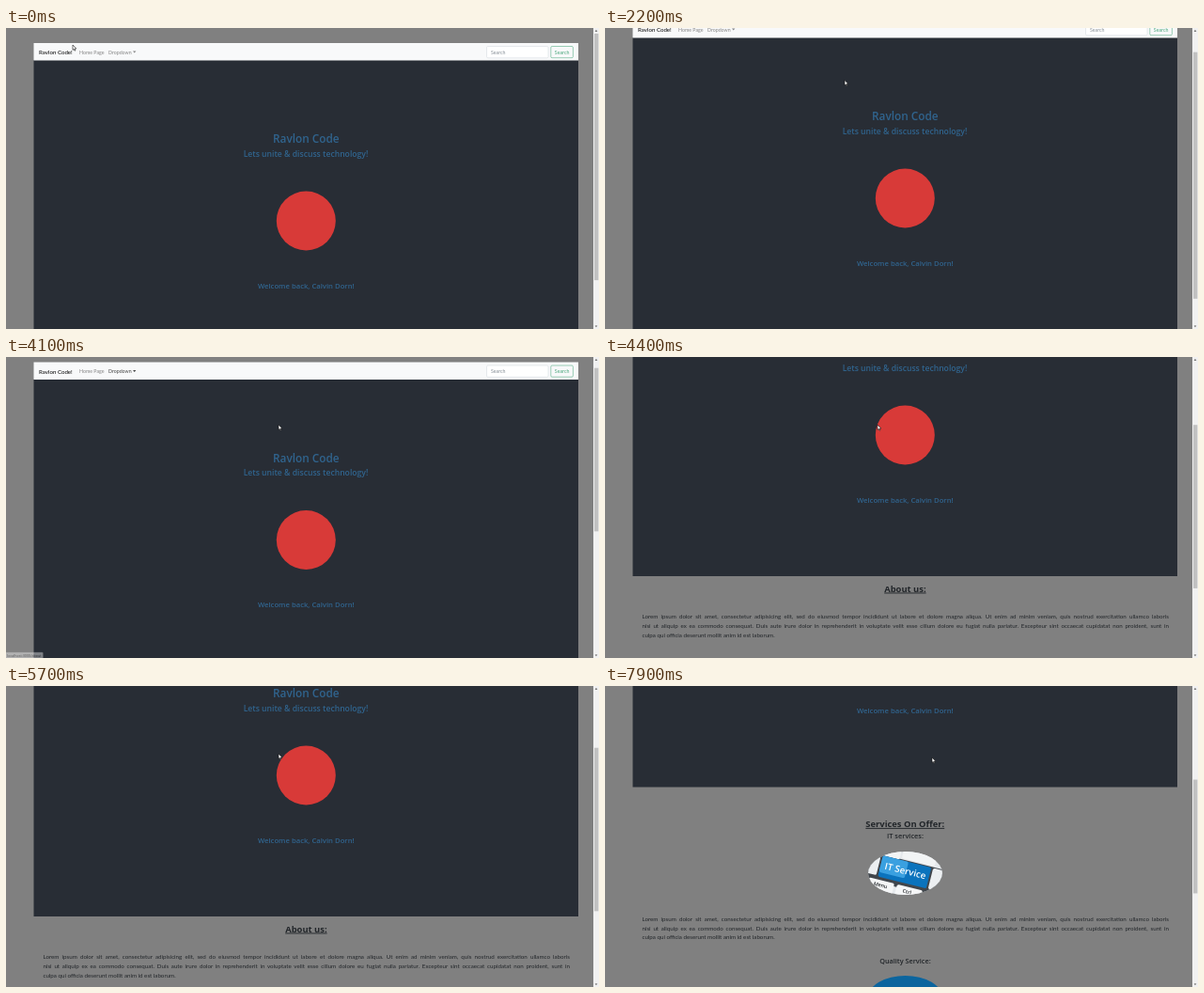
These frames come from a looping animation (631x320 px, 8 s). An HTML page:

```html
<!DOCTYPE html>
<html lang="en">
<head>
<meta charset="utf-8">
<title>Page tour</title>
<style>
  html, body { margin: 0; width: 631px; height: 320px; overflow: hidden; background: #fff; }
  #stage { position: relative; width: 631px; height: 320px; overflow: hidden; background: #fff; }
  #page, #page > svg, #over { position: absolute; left: 0; top: 0; }
  text { font-family: Lato, sans-serif; font-size: 5.25px; fill: #212529; }
  .head text, text.head { font-family: "Open Sans", "Noto Sans", sans-serif; }
  .mid { text-anchor: middle; }
  .head.mid text { font-weight: 600; }
  .blue text { fill: #30648e; }
  .head.mid .title { font-weight: 700; text-decoration: underline; }
  .para { position: absolute; left: 39.5px; width: 560.5px; font: 6.2px/9.8px Lato, sans-serif; color: #212529; }
  .para span { display: block; white-space: nowrap; text-align: justify; text-align-last: justify; }
  .para span:last-child { text-align-last: left; }
</style>
</head>
<body>
<div id="stage">
  <div id="page">
    <svg width="631" height="820" viewBox="0 0 631 820">
      <rect id="ground" width="625" height="820" fill="#808080"/>
      <rect x="29.5" y="34" width="579.5" height="321" fill="#282d35"/>
      <rect x="29.5" y="16" width="579.5" height="18.5" fill="#f8f9fa"/>

      <text x="35" y="28.2" style="font-size:6.15px;fill:#000">Ravlon Code!</text>
      <text id="home" x="78" y="27.8">Home Page</text>
      <g id="drop">
        <text x="109" y="27.8" style="fill:inherit">Dropdown</text>
        <path d="M135 24.6h3.4l-1.7 1.8z"/>
      </g>
      <rect x="511.5" y="19.5" width="65.5" height="12.3" rx="1.3" fill="#fff" stroke="#ced4da" stroke-width=".5"/>
      <text x="516" y="27.8" style="fill:#868e96">Search</text>
      <rect x="579.8" y="19.5" width="23.6" height="12.2" rx="1.3" fill="none" stroke="#4aa77c" stroke-width=".55"/>
      <text class="mid" x="591.6" y="27.8" style="fill:#4aa77c">Search</text>

      <g class="head mid blue">
        <text x="319.3" y="122" style="font-size:11.8px">Ravlon Code</text>
        <text x="319" y="136.6" style="font-size:8.65px">Lets unite &amp; discuss technology!</text>
        <text x="319.3" y="276.8" style="font-size:7.7px">Welcome back, Calvin Dorn!</text>
      </g>
      <circle cx="319.3" cy="205" r="31.5" fill="#d83a38"/>

      <g id="about" class="head mid">
        <text class="title" x="319.4" y="371.5" style="font-size:9.4px">About us:</text>
      </g>

      <g id="services" class="head mid">
        <text class="title" x="319.3" y="397.4" style="font-size:9.4px">Services On Offer:</text>
        <text x="319.5" y="409.8" style="font-size:7.4px">IT services:</text>
        <clipPath id="oval"><ellipse cx="319.5" cy="446.5" rx="39.5" ry="23"/></clipPath>
        <g clip-path="url(#oval)">
          <rect x="279" y="422" width="81" height="49" fill="#e6e9ec"/>
          <g transform="rotate(14 319.5 446.5)">
            <rect x="270" y="433" width="100" height="30" fill="#41464c"/>
            <rect x="270" y="421" width="40" height="13" rx="2" fill="#f2f4f5"/>
            <rect x="312" y="419" width="36" height="13" rx="2" fill="#f2f4f5"/>
            <rect x="275" y="436" width="15" height="20" rx="2" fill="#eceff1"/>
            <rect x="292" y="434" width="53" height="23" rx="2" fill="#0b73bd"/>
            <rect x="292" y="434" width="28" height="18" rx="2" fill="#3aa0e0"/>
            <rect x="347" y="434" width="20" height="23" rx="2" fill="#eceff1"/>
            <rect x="283" y="460" width="28" height="16" rx="2" fill="#f5f6f7"/>
            <rect x="314" y="460" width="28" height="16" rx="2" fill="#f5f6f7"/>
            <text x="319" y="447.5" style="font-size:9.8px;fill:#fff">IT Service</text>
            <text x="297" y="467" style="font-size:5.4px">Menu</text>
            <text x="326" y="467" style="font-size:5.4px">Ctrl</text>
          </g>
        </g>
        <text x="319.4" y="542.2" style="font-size:7.3px">Quality Service:</text>
        <ellipse cx="319.5" cy="578.5" rx="39.5" ry="23" fill="#0b659e"/>
      </g>
    </svg>
    <div id="aboutText"></div>
    <div id="servicesText"></div>
    <svg id="menu" width="631" height="80">
      <rect x="107.2" y="33.2" width="51.6" height="25.6" rx="1.2" fill="#fff" stroke="#c9cbcd" stroke-width=".5"/>
      <rect id="mark" x="107.4" width="51.2" height="10.4"/>
      <text id="item1" x="115" y="42.7">About Us</text>
      <text x="115" y="53.1">Services</text>
    </svg>
  </div>

  <svg id="over" width="631" height="320">
    <rect x="625" width="6" height="320" fill="#f1f1f1"/>
    <path d="M626.6 3.8h2.8l-1.4-1.7zM626.6 316.4h2.8l-1.4 1.7z" fill="#555"/>
    <rect id="thumb" x="626" width="4.4" fill="#c1c1c1"/>
    <g id="status">
      <rect id="box" x="-1" y="314" height="7" rx=".8" fill="#f4f4f4" stroke="#bbb" stroke-width=".4"/>
      <text id="url" class="head" x="1.3" y="318.6" style="font-size:3.7px;fill:#222"></text>
    </g>
    <g id="cursor" fill="#fff" stroke="#111" stroke-width=".6" stroke-linejoin="round">
      <path id="arrow" d="M0 0V5.4L1.2 4.3 2 6.2 2.9 5.8 2.1 4H3.8z"/>
      <path id="hand" d="M-.6.4Q0-.4.6.4V2.4L3 3V5L2.2 7H-.6L-2.2 4.2-1.6 3.6-.6 4.4z"/>
    </g>
  </svg>
</div>
<script>
const $ = id => document.getElementById(id);
const LOOP = 8000, STEP = 100, TRACK = 308;

const lorem = [
  "Lorem ipsum dolor sit amet, consectetur adipisicing elit, sed do eiusmod tempor incididunt ut labore et dolore magna aliqua. Ut enim ad minim veniam, quis nostrud exercitation ullamco laboris",
  "nisi ut aliquip ex ea commodo consequat. Duis aute irure dolor in reprehenderit in voluptate velit esse cillum dolore eu fugiat nulla pariatur. Excepteur sint occaecat cupidatat non proident, sunt in",
  "culpa qui officia deserunt mollit anim id est laborum."
];
const para = top => `<div class="para" style="top:${top}px">` +
  lorem.map(line => `<span>${line}</span>`).join("") + "</div>";
$("aboutText").innerHTML = [393.3, 448, 502.7].map(para).join("");
$("servicesText").innerHTML = para(489.8);

// [time, value...] with linear motion between rows
const scrollKeys = [
  [0, 0], [1500, 0], [1600, 3], [1700, 22], [1900, 54], [2000, 56], [2200, 24], [2400, 0],
  [4000, 0], [4100, 10.5], [4200, 36], [4500, 165], [4700, 228], [4900, 247.5],
  [5200, 247.5], [5400, 226], [5700, 110], [6000, 14], [6200, 0],
  [7300, 0], [7400, 12], [7600, 100], [7800, 220], [7900, 247.5]
];
const cursorKeys = [
  [0, 71, 18], [100, 72, 19], [400, 90, 25], [1000, 92, 25.5], [1500, 255, 55.5], [2400, 255, 55.5],
  [2700, 128, 25], [3000, 127.5, 25], [3300, 125, 39], [3700, 125, 39], [4000, 290, 72],
  [6100, 290, 72], [6500, 122, 26], [6700, 121, 26], [6900, 125, 50], [7100, 125, 50], [7400, 348, 76]
];
// [time, value] held until the next row
const pageKeys = [[0, "home"], [3800, "about"], [7100, "services"]];
const hoverKeys = [
  [0, ""], [300, "home"], [1100, ""], [2700, "drop"], [3200, "item1"], [3800, ""],
  [6500, "drop"], [6800, "item1"], [6900, "item2"], [7200, ""]
];
const heights = { home: 376, about: 567.5, services: 815 };
const paths = { home: "App.js", item1: "about", item2: "services" };

function held(keys, t) {
  return keys.filter(k => k[0] <= t).pop()[1];
}
function moved(keys, t) {
  const i = keys.findIndex(k => k[0] > t);
  if (i < 0) return keys[keys.length - 1].slice(1);
  const a = keys[i - 1], b = keys[i], u = (t - a[0]) / (b[0] - a[0]);
  return a.slice(1).map((v, n) => v + (b[n + 1] - v) * u);
}
const show = (id, on) => { $(id).style.display = on ? "" : "none"; };

function draw(t) {
  const [scroll] = moved(scrollKeys, t);
  const [x, y] = moved(cursorKeys, t);
  const page = held(pageKeys, t), hover = held(hoverKeys, t);
  const height = heights[page];

  $("page").style.transform = `translateY(${-scroll}px)`;
  $("ground").setAttribute("height", height - 5);
  for (const name of ["about", "services"]) {
    show(name, page === name);
    show(name + "Text", page === name);
  }

  $("thumb").setAttribute("y", 6 + scroll * TRACK / height);
  $("thumb").setAttribute("height", 320 * TRACK / height);

  $("home").style.fill = hover === "home" ? "#4d4d4d" : "#858585";
  $("drop").style.fill = t >= 2700 ? "#444" : "#858585";

  const active = page === "about";
  const onItem = hover.startsWith("item");
  show("menu", (t >= 2800 && t < 3800) || (t >= 6600 && t < 7100));
  show("mark", active || onItem);
  $("mark").setAttribute("y", hover === "item2" && !active ? 46 : 35.4);
  $("mark").style.fill = active ? "#007bff" : "#f0f2f4";
  $("item1").style.fill = active ? "#fff" : "#212529";

  const fading = t >= 3800 && t < 4200;
  show("status", hover || fading);
  $("status").style.opacity = fading ? 1 - (t - 3700) / 700 : 1;
  $("url").textContent = "localhost:3000/" +
    (paths[hover] || (fading ? "about" : page === "home" ? "App.js#" : page + "#"));
  if (hover || fading) $("box").setAttribute("width", $("url").getComputedTextLength() + 4);

  $("cursor").setAttribute("transform", `translate(${x} ${y})`);
  show("hand", hover);
  show("arrow", !hover);
}

function tick(now) {
  draw(Math.floor(now % LOOP / STEP) * STEP);
  requestAnimationFrame(tick);
}
draw(0);
requestAnimationFrame(tick);
</script>
</body>
</html>
```
